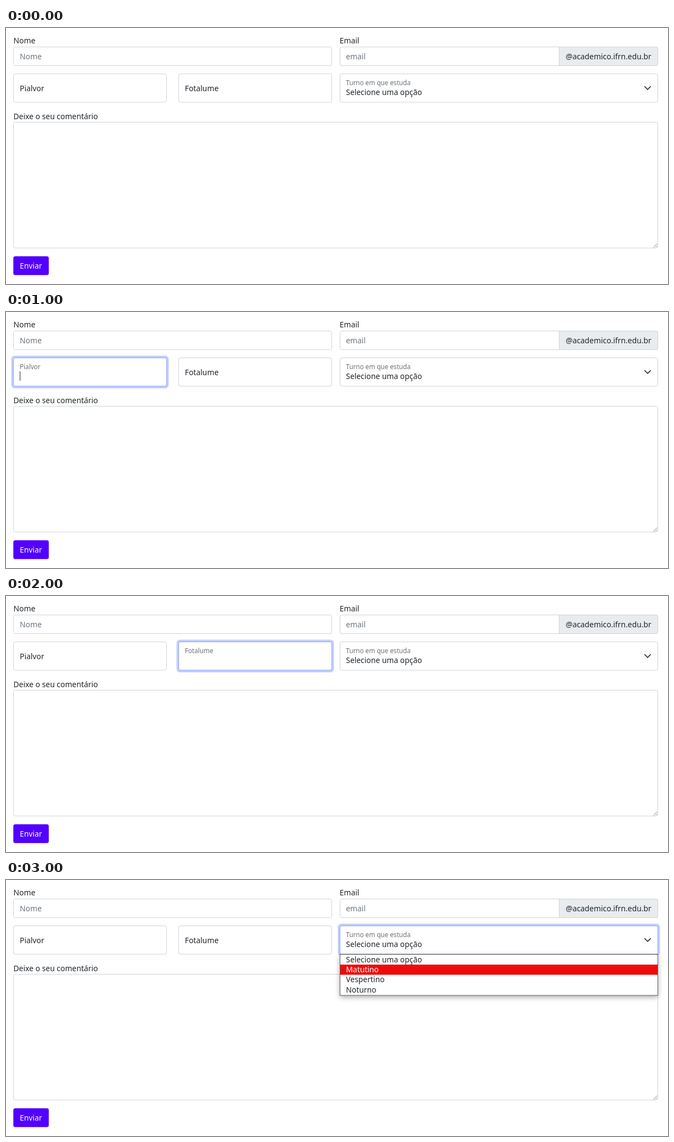
Recreate the animation shown at these times as an HTML page. Size 1202 px wide and 466 px high, loop 4000 ms.

```html
<!DOCTYPE html>
<html lang="pt-BR">
<head>
<meta charset="utf-8">
<title>Formulário</title>
<style>
  html, body { margin: 0; width: 100%; height: 100%; overflow: hidden; background: #fff; }
  svg { display: block; width: 1202px; height: 466px; }
  text { font: 13.86px "Noto Sans", "Open Sans", sans-serif; fill: #212529; }
  .hint { fill: #6c757d; }
  .small { font-size: 11.7px; fill: #6c7074; }
  .light { fill: #fff; }
  .box { fill: #fff; stroke: #ced4da; rx: 3.2px; }
  .ring { fill: #c1ceff; rx: 6.5px; }
  .focus { fill: #fff; stroke: #8ba2fb; rx: 3.2px; }
  .menu { fill: #fff; stroke: #5c5c5c; filter: drop-shadow(0 3px 5px rgba(0, 0, 0, .32)); }
  .on, .off { animation: 4s step-end infinite; }
  .on { animation-name: show; }
  .off { animation-name: hide; }
  .first { animation-delay: -3s; }
  .second { animation-delay: -2s; }
  .third { animation-delay: -1s; }
  @keyframes show { 0% { visibility: visible; } 25%, 100% { visibility: hidden; } }
  @keyframes hide { 0% { visibility: hidden; } 25%, 100% { visibility: visible; } }
</style>
</head>
<body>
<svg viewBox="0 0 1202 466" xmlns="http://www.w3.org/2000/svg">
  <!-- name and email -->
  <text x="13.5" y="28">Nome</text>
  <rect class="box" x="13.5" y="34.5" width="578" height="34"/>
  <text class="hint" x="25" y="56.5">Nome</text>

  <text x="605.8" y="28">Email</text>
  <rect class="box" x="606.5" y="34.5" width="577" height="34"/>
  <path d="M1004.5 34.5H1180.3a3.2 3.2 0 0 1 3.2 3.2V65.3a3.2 3.2 0 0 1-3.2 3.2H1004.5z" fill="#e9ecef" stroke="#ced4da"/>
  <text class="hint" x="617.3" y="56.5">email</text>
  <text x="1016.2" y="56.5">@academico.ifrn.edu.br</text>

  <!-- comment -->
  <text x="13.5" y="166">Deixe o seu comentário</text>
  <rect class="box" x="13.5" y="171.5" width="1170" height="229"/>
  <path d="M1175.5 399.5l7-7M1179.5 399.5l3-3" stroke="#777" stroke-width=".9"/>

  <!-- floating fields -->
  <rect class="box" x="13.5" y="83.5" width="278" height="51.5"/>
  <text class="off first" x="25" y="114.5">Pialvor</text>
  <g class="on first">
    <rect class="ring" x="9.6" y="79.6" width="285.8" height="59.3"/>
    <rect class="focus" x="13.5" y="83.5" width="278" height="51.5"/>
    <text class="small" x="25" y="104">Pialvor</text>
    <path d="M25.5 108V125" stroke="#212529"/>
  </g>

  <rect class="box" x="313.5" y="83.5" width="278" height="51.5"/>
  <text class="off second" x="324.7" y="114.5">Fotalume</text>
  <g class="on second">
    <rect class="ring" x="309.6" y="79.6" width="285.8" height="59.3"/>
    <rect class="focus" x="313.5" y="83.5" width="278" height="51.5"/>
    <text class="small" x="324.7" y="104">Fotalume</text>
  </g>

  <!-- select -->
  <rect class="box" x="606.5" y="83.5" width="577" height="51.5"/>
  <g class="on third">
    <rect class="ring" x="602.6" y="79.6" width="584.8" height="59.3"/>
    <rect class="focus" x="606.5" y="83.5" width="577" height="51.5"/>
  </g>
  <text class="small" x="617.3" y="104">Turno em que estuda</text>
  <text x="617.3" y="122">Selecione uma opção</text>
  <path d="M1159.8 106.6l5.2 5.2 5.2-5.2" fill="none" stroke="#343a40" stroke-width="1.7" stroke-linecap="round" stroke-linejoin="round"/>
  <g class="on third">
    <rect class="menu" x="606.5" y="135.5" width="577" height="74.5"/>
    <rect x="607" y="154" width="576" height="18.5" fill="#ef0b0b"/>
    <text x="617.3" y="150">Selecione uma opção</text>
    <text class="light" x="617.3" y="168">Matutino</text>
    <text x="617.3" y="186">Vespertino</text>
    <text x="617.3" y="204.5">Noturno</text>
  </g>

  <rect x="13.3" y="415.4" width="64.4" height="34.4" rx="3.6" fill="#5200ff"/>
  <text class="light" x="25" y="438">Enviar</text>
</svg>
</body>
</html>
```
